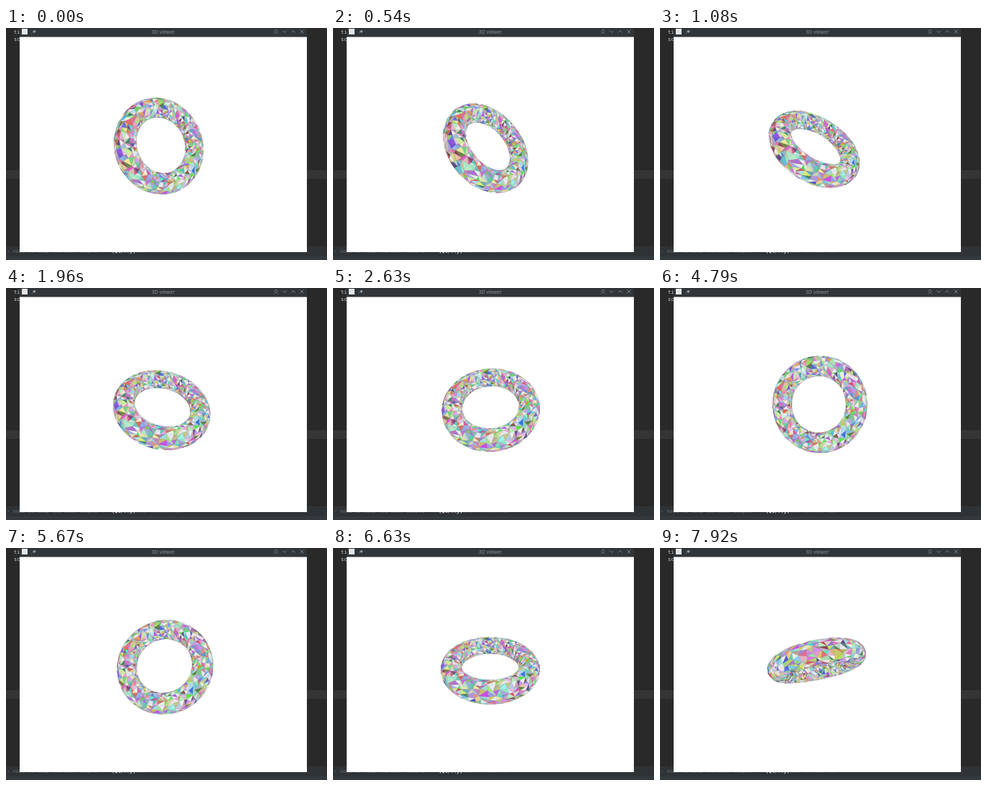
An HTML page with a canvas for the animation above (8 s loop, 447 by 323 pixels).

```html
<!DOCTYPE html>
<html lang="en">
<head>
<meta charset="utf-8">
<title>3D viewer</title>
<style>
  html, body { margin: 0; width: 447px; height: 323px; overflow: hidden; background: #292929; }
  svg, canvas { position: absolute; left: 0; top: 0; display: block; }
  .mono { font: 7px "DejaVu Sans Mono", monospace; }
  .title { font: 7px "Noto Sans", sans-serif; }
</style>
</head>
<body>
<svg width="447" height="323" viewBox="0 0 447 323">
  <rect width="447" height="323" fill="#292929"/>
  <rect y="198" width="447" height="12" fill="#353535"/>
  <rect y="304" width="447" height="14" fill="#303336"/>
  <rect y="318" width="447" height="5" fill="#34393d"/>
  <g class="mono" fill="#d0d0d0">
    <text x="11" y="8">ti</text>
    <text x="11" y="18">sc</text>
    <text x="1" y="313" fill="#63676a">› need to keep the mesh simple</text>
    <text x="147" y="313" font-weight="bold">(Qt/Tfy)</text>
    <text x="182" y="313" fill="#505457">and refresh now</text>
  </g>
  <rect x="19" width="400" height="12.5" fill="#31363a"/>
  <rect x="19" y="12.5" width="400" height="299.5" fill="#fff"/>
  <rect x="22" y="1" width="8" height="8" fill="#e4e4e4"/>
  <text class="title" x="219" y="7.6" text-anchor="middle" fill="#8b9093">3D viewer</text>
  <g fill="none" stroke="#8f9497" stroke-width=".8">
    <path d="M36 7.5l2-2" />
    <path d="M37 4l3 3M38 4.7l1.6-1.6 1.7 1.7-1.6 1.6" fill="#a4a8aa"/>
    <path d="M373.3 4.8l2.7-2.6 2.7 2.6M373.3 8l2.7-2.6 2.7 2.6"/>
    <path d="M385.3 3.7l2.7 2.7 2.7-2.7M397.3 6.4l2.7-2.7 2.7 2.7"/>
    <path d="M409.5 2.5l5 5M414.5 2.5l-5 5"/>
  </g>
</svg>
<canvas id="view" width="447" height="323"></canvas>
<script>
const ctx = document.getElementById('view').getContext('2d');
const LOOP = 8000, CX = 219, CY = 162, DIST = 230;
const RING = 53.2, TUBE = 13.6, NU = 56, NV = 16;

// [time, tilt x, tilt y]: direction and angle of the ring's lean
const poses = [
  [0, .469, -.188], [540, .643, -.544], [1080, .528, -.83],
  [2630, -.06, -.64], [4790, -.25, 0], [5000, -.24, -.03], [6250, -.08, -.67],
  [6630, 0, -.944], [7040, -.06, -1.04], [7920, -.37, -1.77]
];

// [first update, last update, count]
const bursts = [
  [0, 0, 1], [40, 1080, 24], [1460, 2460, 7], [2630, 3580, 6], [3830, 4790, 6],
  [5000, 5000, 1], [5290, 6250, 6], [6420, 7040, 4], [7330, 7920, 4]
];
const updates = bursts.flatMap(([a, b, n]) =>
  Array.from({ length: n }, (_, i) => a + (b - a) * i / Math.max(1, n - 1)));

let seed = 71;
function rnd() {
  seed = (seed * 1664525 + 1013904223) >>> 0;
  return seed / 4294967296;
}

const verts = [], faces = [];

function faceColor() {
  const kind = rnd(), hue = rnd() * 360;
  if (kind < .16) return `hsl(${hue},40%,93%)`;
  if (kind < .23) return `hsl(${hue},30%,40%)`;
  return `hsl(${hue},${30 + rnd() * 50}%,${56 + rnd() * 28}%)`;
}

for (let i = 0; i < NU; i++) {
  for (let j = 0; j < NV; j++) {
    const u = (i + rnd() * .7) / NU * 2 * Math.PI;
    const v = (j + rnd() * .6) / NV * 2 * Math.PI;
    const rad = RING + TUBE * Math.cos(v);
    verts.push([rad * Math.cos(u), rad * Math.sin(u), TUBE * Math.sin(v)]);
  }
}
const at = (i, j) => (i % NU) * NV + j % NV;
for (let i = 0; i < NU; i++) {
  for (let j = 0; j < NV; j++) {
    const a = at(i, j), b = at(i + 1, j), c = at(i + 1, j + 1), d = at(i, j + 1);
    const pair = rnd() < .5 ? [[a, b, d], [b, c, d]] : [[a, b, c], [a, c, d]];
    for (const ids of pair) faces.push({ ids, color: faceColor() });
  }
}

function tiltAt(t) {
  let k = 0;
  while (k < poses.length - 2 && t >= poses[k + 1][0]) k++;
  const [t0, x0, y0] = poses[k], [t1, x1, y1] = poses[k + 1];
  const p = Math.min(1, (t - t0) / (t1 - t0));
  return [x0 + (x1 - x0) * p, y0 + (y1 - y0) * p];
}

// Turn about an axis lying in the screen plane, then project
function projector([tx, ty]) {
  const angle = Math.hypot(tx, ty) || 1e-9;
  const kx = -ty / angle, ky = tx / angle;
  const c = Math.cos(angle), s = Math.sin(angle);
  return ([x, y, z]) => {
    const along = (kx * x + ky * y) * (1 - c);
    const px = x * c + ky * z * s + kx * along;
    const py = y * c - kx * z * s + ky * along;
    const pz = z * c + (kx * y - ky * x) * s;
    const scale = DIST / (DIST - pz);
    return [CX + px * scale, CY + py * scale, pz];
  };
}

function draw(t) {
  const pts = verts.map(projector(tiltAt(t)));
  const shown = [];
  for (const { ids, color } of faces) {
    const [a, b, c] = ids.map(i => pts[i]);
    const area = (b[0] - a[0]) * (c[1] - a[1]) - (b[1] - a[1]) * (c[0] - a[0]);
    if (area > 0) shown.push({ a, b, c, color, z: a[2] + b[2] + c[2] });
  }
  shown.sort((p, q) => p.z - q.z);
  ctx.clearRect(0, 0, 447, 323);
  ctx.lineJoin = 'round';
  for (const { a, b, c, color } of shown) {
    ctx.beginPath();
    ctx.moveTo(a[0], a[1]);
    ctx.lineTo(b[0], b[1]);
    ctx.lineTo(c[0], c[1]);
    ctx.closePath();
    ctx.fillStyle = ctx.strokeStyle = color;
    ctx.lineWidth = .4;
    ctx.fill();
    ctx.stroke();
    ctx.strokeStyle = 'rgba(110,110,110,.35)';
    ctx.lineWidth = .3;
    ctx.stroke();
  }
}

const start = performance.now();
let last = -1;
function tick() {
  const t = (performance.now() - start) % LOOP;
  const step = updates.findLast(u => u <= t + .5) ?? 0;
  if (step !== last) draw(last = step);
  requestAnimationFrame(tick);
}
tick();
</script>
</body>
</html>
```
